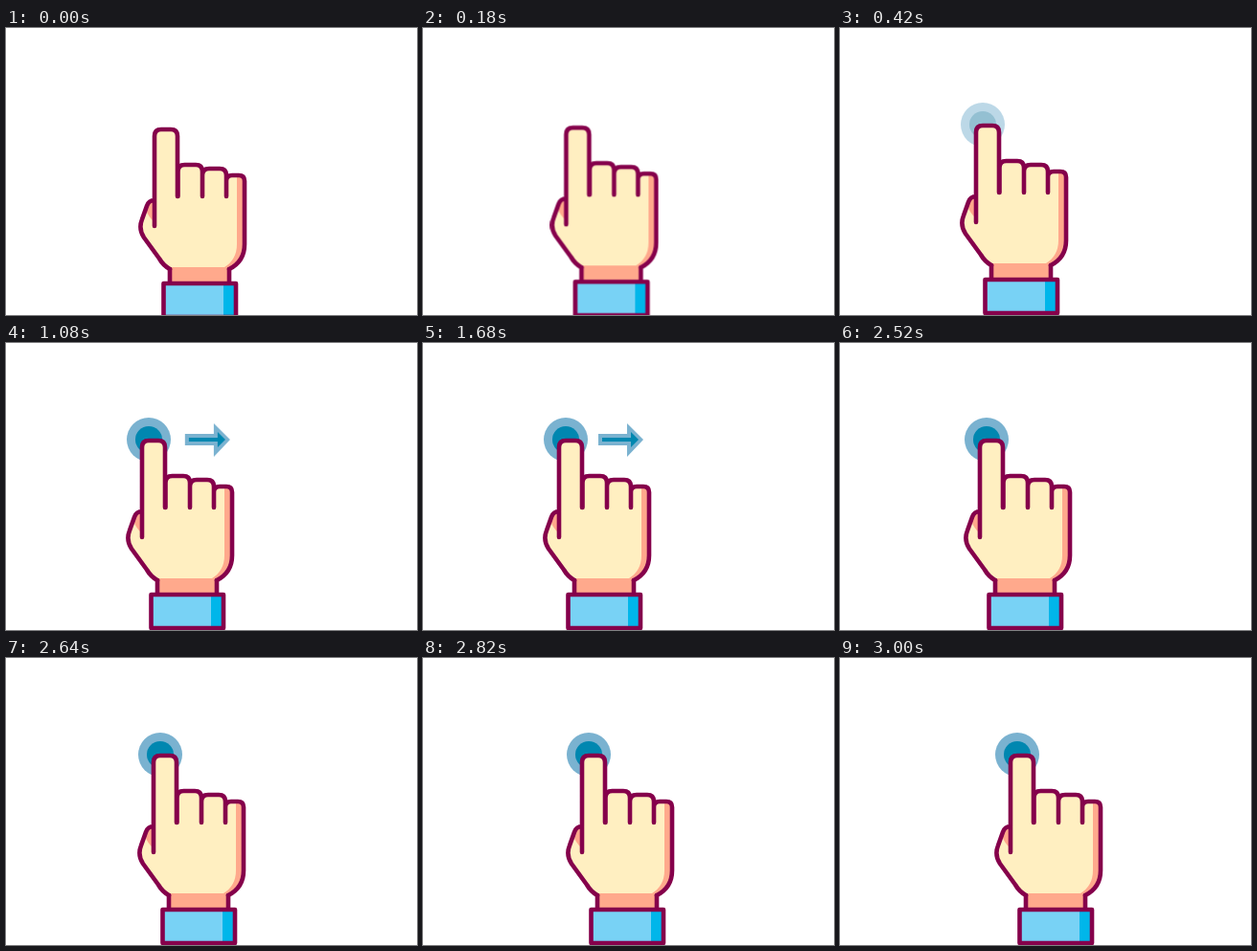
These frames come from a looping animation (429x300 px, 3.12 s). An HTML page without scripts:

```html
<!DOCTYPE html>
<html lang="en">
<head>
<meta charset="utf-8">
<title>Tap and drag</title>
<style>
  html, body { margin: 0; width: 100%; height: 100%; overflow: hidden; background: #fff; }
  svg { display: block; width: 429px; height: 300px; }

  .line { fill: none; stroke: #85004b; stroke-width: 4.6; stroke-linecap: round; stroke-linejoin: round; }
  .skin { fill: #ffefc1; }
  .shade { fill: #ffa98c; }
  .pale { fill: #7ab2d0; }
  .deep { fill: #0087b0; }

  .hand, .dot, .arrow, .deep-dot { animation: 3120ms infinite step-end; }
  .hand { animation-name: hand; }
  .dot { animation-name: dot; }
  .deep-dot { animation-name: deep-dot; }
  .arrow { animation-name: show, slide; }

  /* press in, rest, drag right */
  @keyframes hand {
    0% { transform: translate(13px, 4px); }
    1.92% { transform: translate(13px, 4px); animation-timing-function: steps(7, start); }
    15.38% { transform: translate(0, 0); }
    80.76% { transform: translate(0, 0); animation-timing-function: steps(9, start); }
    98.07%, 100% { transform: translate(36px, 0); }
  }
  @keyframes dot {
    0% { opacity: 0; }
    13.46% { opacity: .5; }
    19.23%, 100% { opacity: 1; }
  }
  @keyframes deep-dot {
    0% { fill: #2a82a6; }
    19.23%, 100% { fill: #0087b0; }
  }
  @keyframes show {
    0% { opacity: 0; }
    26.92% { opacity: 1; }
    76.92%, 100% { opacity: 0; }
  }
  /* two passes to the right */
  @keyframes slide {
    0%, 26.92%, 51.92% { transform: translate(0, 0); }
    28.84%, 53.84% { transform: translate(4px, 0); animation-timing-function: steps(12, end); }
    51.91%, 76.92%, 100% { transform: translate(19.27px, 0); }
  }
</style>
</head>
<body>
<svg viewBox="0 0 429 300" xmlns="http://www.w3.org/2000/svg">
  <g class="arrow">
    <path class="pale" d="M179 95h30V84l17 17-17 18v-12h-30z"/>
    <path class="deep" d="M183 99h30v-6l8 8-8 8v-6h-30z"/>
  </g>

  <g class="hand">
    <g class="dot">
      <circle class="pale" cx="149" cy="101" r="23"/>
      <circle class="deep deep-dot" cx="149" cy="101" r="14"/>
    </g>

    <!-- wrist -->
    <path class="shade" d="M158 240h62v23h-62z"/>
    <path class="line" d="M158 248v15M220 248v15"/>

    <!-- palm and fingers -->
    <path class="skin" d="M142 176V109q0-7 7-7h10q7 0 7 7v37q0-7 7-7h12q7 0 7 7v4q0-7 7-7h11q7 0 7 7v6q0-6 6-6h7q6 0 6 6v66q0 17-16 24h-62q-7-3-11-9l-16-22q-5-8-2-17l4-13q2-6 8-6z"/>
    <path class="shade" d="M228 150h2q6 0 6 6v66q0 17-16 24h-5q13-8 13-24z"/>
    <path class="shade" d="M142 176q-6 0-8 6l-1 4q3 8 9 13z"/>
    <path class="line" d="M142 203V109q0-7 7-7h10q7 0 7 7v63M166.500 172V146q0-7 7-7h11.500q7 0 7 7v26M192 150q0-7 7-7h11q7 0 7 7v22M217 156q0-6 6-6h7q6 0 6 6v66q0 18-16 26M142 176q-6 0-8 6l-5 14q-4 10 2 19l16 22q4 7 11 11"/>

    <!-- cuff -->
    <path fill="#78d2f5" d="M151.500 263h76v35h-76z"/>
    <path fill="#00b6ea" d="M214 263h13.500v35H214z"/>
    <path class="line" d="M151.500 263h75.500v35h-75.500z"/>
  </g>
</svg>
</body>
</html>
```
